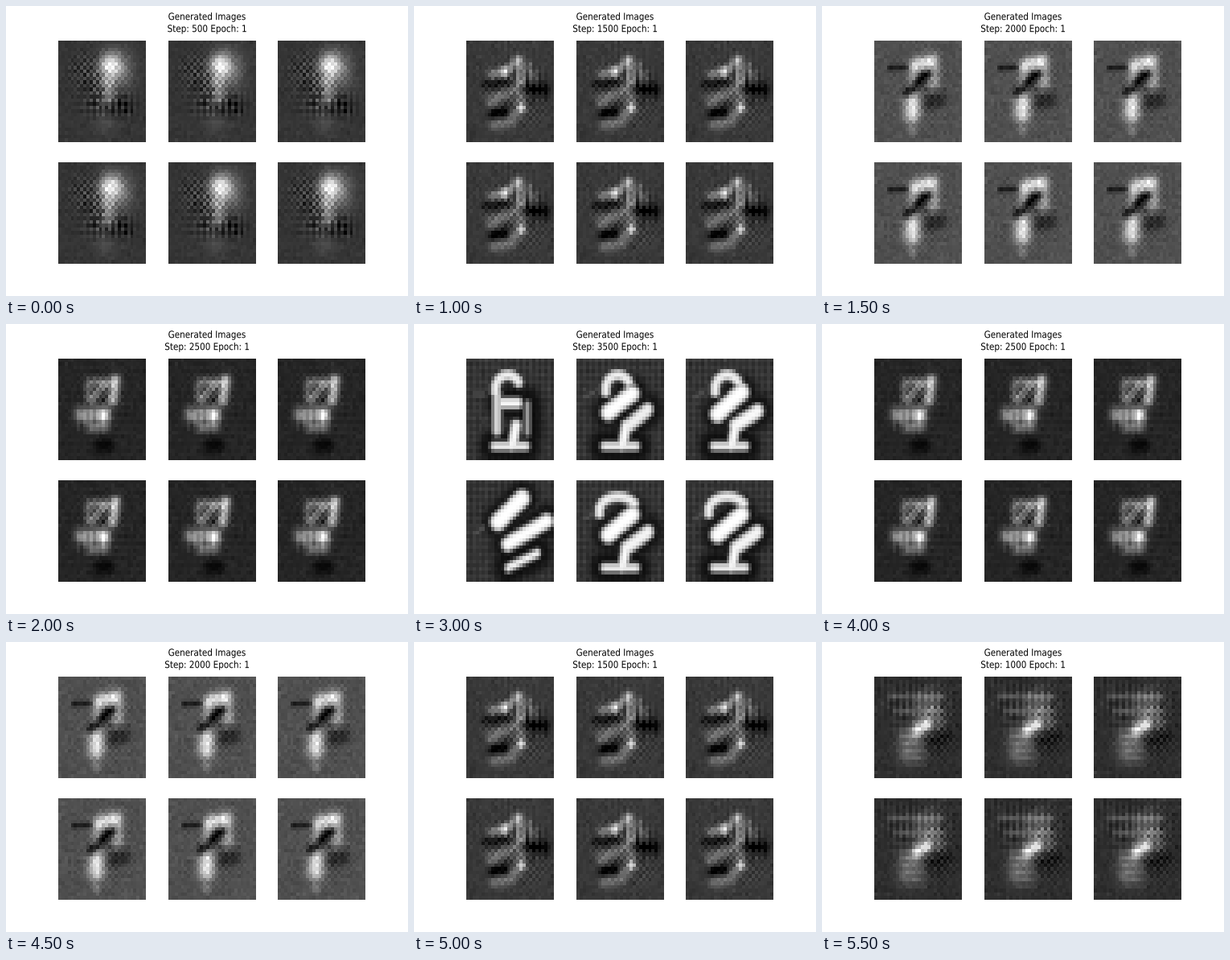
Recreate the animation shown at these times as a matplotlib script. Size 500x360 px, loop 6 s.

```python
import numpy as np
import matplotlib.pyplot as plt
from matplotlib.animation import FuncAnimation
from matplotlib.patches import PathPatch
from matplotlib.textpath import TextPath
from matplotlib.transforms import Affine2D

W, H, N = 500, 360, 28
SQUEEZE = W / (8 / 5 * H)       # an 8:5 figure shown on a narrower stage
ROW, COL = np.mgrid[:N, :N]
X, Y = COL + 0.5, ROW + 0.5
CHECKS = (-1.0) ** (COL + ROW)
BARS = (-1.0) ** COL
LINES = (-1.0) ** ROW
rng = np.random.default_rng(7)


def distance(*points):
    """Distance from each cell to a polyline, or to a single point."""
    best = np.full((N, N), np.inf)
    for (x0, y0), (x1, y1) in zip(points, points[1:] or points):
        dx, dy = x1 - x0, y1 - y0
        t = ((X - x0) * dx + (Y - y0) * dy) / (dx * dx + dy * dy or 1)
        t = np.clip(t, 0, 1)
        best = np.minimum(best, np.hypot(X - x0 - t * dx, Y - y0 - t * dy))
    return best


def glow(amp, width, *points):
    return amp * np.exp(-(distance(*points) / width) ** 2 / 2)


def weave(pattern, amp, width, *points):
    return glow(amp, width, *points) * pattern * rng.uniform(0.2, 1.4, (N, N))


def backdrop(level, grain=3):
    return level + rng.normal(0, grain, (N, N))


def step_500():
    return (backdrop(53)
            + glow(150, 2.2, (16.6, 6.9)) + glow(65, 3.8, (18.8, 8))
            + glow(70, 1.4, (16, 12), (16, 16)) + glow(22, 2.5, (15, 22.5))
            + glow(-26, 1.6, (17.5, 18.3), (22, 18.3))
            + weave(CHECKS, 30, 3.5, (9, 9), (14, 13))
            + weave(CHECKS, 14, 4, (18, 8))
            + weave(BARS, 26, 2, (12, 18), (22, 18))
            + weave(LINES, 14, 2.5, (9, 17), (20, 17)))


def step_1000():
    return (backdrop(46, 4)
            + glow(150, 1.2, (13.6, 14.8), (17, 13.2))
            + glow(55, 3, (17, 8), (17, 10)) + glow(55, 2, (10, 17), (10, 21))
            + glow(45, 2.2, (14, 17), (14, 21)) + glow(35, 1.4, (21, 13))
            + glow(40, 0.6, (5, 5.5), (21, 5.5)) + glow(35, 0.6, (7, 9.5), (21, 9.5))
            + glow(-22, 2.2, (18, 17.5), (22, 16.5))
            + weave(BARS, 18, 4, (9, 7), (19, 7))
            + weave(CHECKS, 20, 4, (19, 9), (20, 17))
            + weave(LINES, 14, 3, (12, 15), (12, 21)))


def step_1500():
    return (backdrop(57, 4)
            + glow(65, 0.9, (8, 9.3), (12.5, 8.4), (16.8, 5.5))
            + glow(110, 1, (12.2, 8.6)) + glow(75, 1, (16.8, 5.5), (17.6, 11))
            + glow(45, 0.8, (20, 7), (21.5, 11))
            + glow(55, 1.2, (8, 17), (12, 15), (17, 13), (17.5, 19), (14, 22.5), (9, 23))
            + glow(110, 0.8, (17.6, 18.6))
            + glow(-55, 1.4, (20, 13), (25, 13.5))
            + glow(-65, 1.1, (8.5, 20.3), (12, 19.8))
            + glow(-38, 0.8, (6, 12), (14, 12))
            + weave(BARS, 24, 3.5, (16, 9), (21, 11))
            + weave(CHECKS, 18, 5, (12, 13), (18, 17)))


def step_2000():
    return (backdrop(80, 4)
            + glow(130, 1.4, (13.5, 6.6), (17, 6)) + glow(80, 1.3, (19, 5.5), (19, 11.5))
            + glow(65, 1.1, (12.5, 8), (12, 12))
            + glow(-90, 1, (10.5, 14.5), (14, 11.5), (17.5, 9))
            + glow(-50, 0.6, (5, 7.5), (10, 7.5))
            + glow(150, 1.8, (12.2, 17), (12.2, 20)) + glow(40, 1, (12.2, 25))
            + glow(-42, 1.5, (17.5, 17), (21, 16.5))
            + weave(CHECKS, 13, 5, (16, 8), (15, 18))
            + weave(LINES, 11, 3.5, (18, 14)))


def step_2500():
    return (backdrop(38)
            + glow(145, 1.1, (18.4, 6), (17.4, 11.5)) + glow(70, 0.9, (10, 6.5), (17, 6.5))
            + glow(75, 1, (14.5, 7.5), (11, 11)) + glow(45, 0.9, (9.5, 8), (9.5, 11))
            + glow(115, 1.5, (7.5, 15.6), (14.5, 15.2)) + glow(110, 1.3, (14.8, 16))
            + glow(70, 1.1, (10.3, 19), (14.8, 19)) + glow(-28, 1.6, (13.5, 24), (16, 24))
            + weave(CHECKS, 24, 3, (12, 9), (15, 9))
            + weave(BARS, 15, 2.3, (8, 17), (14, 17))
            + weave(LINES, 7, 7, (14, 14)))


def bar(x, y, length, degrees):
    """End points of a bar around its centre, rising to the right."""
    dx = length / 2 * np.cos(np.radians(degrees))
    dy = length / 2 * np.sin(np.radians(degrees))
    return (x - dx, y + dy), (x + dx, y - dy)


def glyph(lean, arch, lift):
    """Arch, sash, arm, stem and foot; they tilt more as lean goes to 1."""
    angles = np.radians(np.linspace(190, 30, 9))
    top = [(13.3 + arch * np.cos(a), 8.5 - 4 * np.sin(a)) for a in angles]
    parts = [
        (1.5 + lean, 255, bar(14, 12.3 - lift, 5 + 5 * lean, 40 * lean)),
        (1 + 1.1 * lean, 165 + 90 * lean,
         bar(19.5, 16.5 - lift / 2, 8 + lift * 1.5, 90 - 63 * lean)),
        (1.2, 255, bar(14 + lift, 24.2 - lift / 2, 10, 6 * lift)),
        (0.9, 90, bar(4, 10 + lift, 3.5, 30 * lean)),
    ]
    if arch:
        parts += [(1.5, 245, top), (1.6, 255, ((16, 18.5), (14.8, 24)))]
    if lean == 0:
        parts.append((1.4, 225, bar(9.8, 15, 10, 90)))

    near = np.min([distance(*points) for _, _, points in parts[:3]], axis=0)
    img = backdrop(54) + 5 * BARS + 4 * LINES
    img *= 1 - 0.72 * np.exp(-(near / 5) ** 4)
    for width, level, points in parts:
        ink = 1 / (1 + np.exp((distance(*points) - width) / 0.4))
        img = np.maximum(img, level * ink)
    return img


def panels(img):
    """Six nearly equal samples of one field."""
    return [img * rng.normal(1, 0.03, (N, N)) for _ in range(6)]


SHEETS = {500 * (k + 1): panels(make()) for k, make in enumerate(
    [step_500, step_1000, step_1500, step_2000, step_2500])}
SHEETS[3500] = [glyph(0, 4, 0), glyph(0.85, 4, 0), glyph(0.95, 4, 0),
                glyph(1, 0, 4), glyph(0.9, 6, 0), glyph(0.9, 6, 0)]
SHEETS[3000] = [(a + b) / 2 for a, b in zip(SHEETS[2500], SHEETS[3500])]

fig = plt.figure(figsize=(W / 100, H / 100), dpi=100, facecolor="white")
ax = fig.add_axes([0, 0, 1, 1])
ax.axis("off")


def line_path(text, baseline):
    path = TextPath((0, 0), text, size=12)
    box = path.get_extents()
    place = Affine2D().translate(-(box.x0 + box.x1) / 2, 0)
    return place.scale(SQUEEZE, -1).translate(W / 2, baseline).transform_path(path)


def add_line(text, baseline):
    return ax.add_patch(PathPatch(line_path(text, baseline), fc="black", lw=0))


side = 0.35 * H
width = int(side * SQUEEZE)
cell = 0.775 * W / 3.4
images = []
for k in range(6):
    left = round(0.125 * W + k % 3 * cell * 1.2 + (cell - side * SQUEEZE) / 2)
    top = round(0.12 * H + k // 3 * side * 1.2)
    images.append(ax.imshow(
        np.zeros((N, N)), cmap="gray", vmin=0, vmax=255, aspect="auto",
        interpolation="nearest", extent=(left, left + width, top + side, top)))
ax.set_xlim(0, W)
ax.set_ylim(H, 0)

add_line("Generated Images", 17.2)
counter = add_line("Step: 500 Epoch: 1", 32.2)


def draw(i):
    step = 500 * (7 - abs(6 - i))   # up to 3500 and back
    for image, data in zip(images, SHEETS[step]):
        image.set_data(np.clip(data, 0, 255))
    counter.set_path(line_path(f"Step: {step} Epoch: 1", 32.2))
    return [*images, counter]


anim = FuncAnimation(fig, draw, frames=12, interval=500, repeat=True,
                     repeat_delay=0)
plt.show()
```
